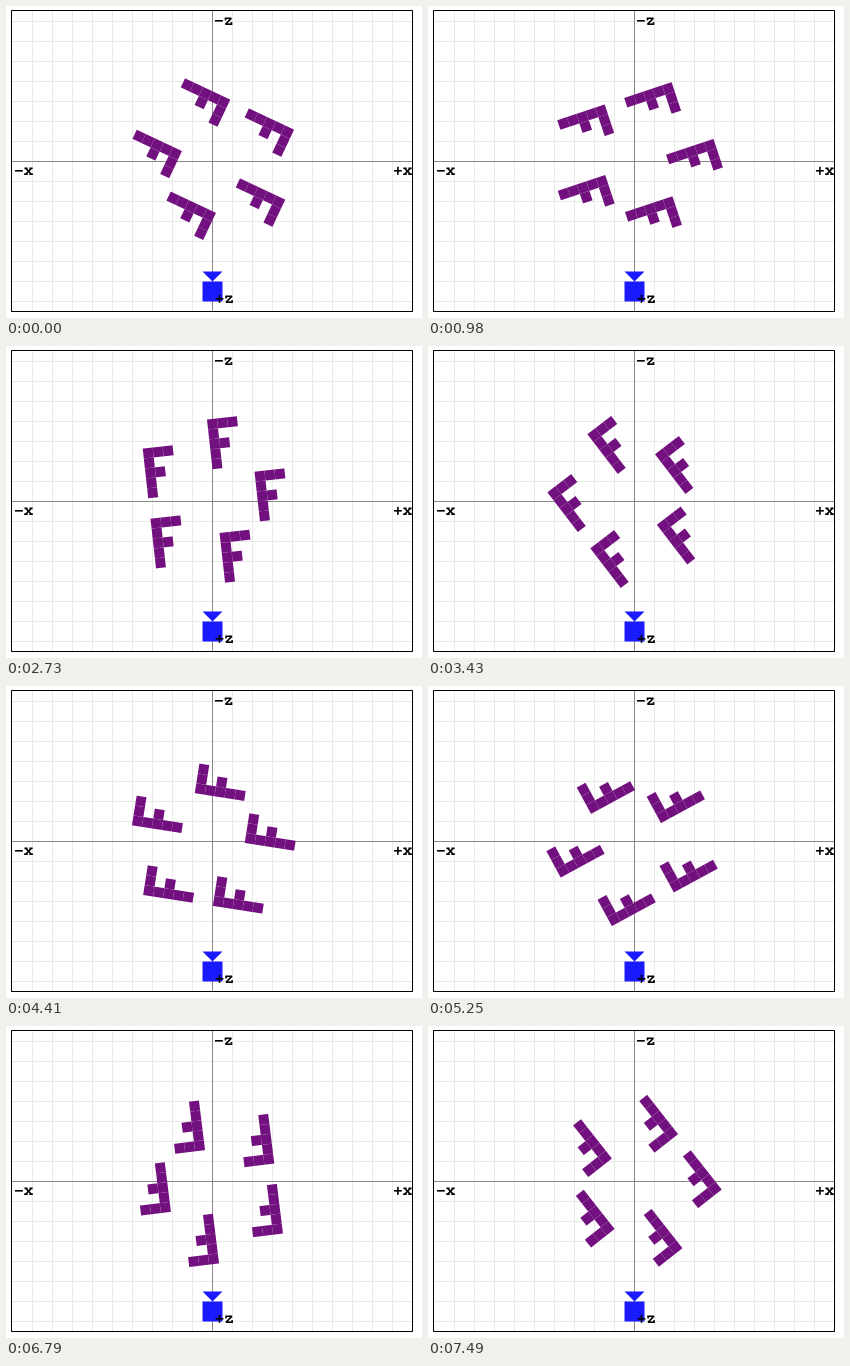
Write a matplotlib script that moves like this. It is 416 px wide and 312 px high and loops after 7560 ms.

```python
import numpy as np
import matplotlib.pyplot as plt
from matplotlib.animation import FuncAnimation
from matplotlib.patches import Polygon, Rectangle

W, H, DPI = 416, 312, 100
FRAMES, INTERVAL = 108, 70
CX, CY = 206.5, 155.5
RADIUS, COUNT = 60, 5
START, STEP = 115.2, -3.116      # degrees, degrees per frame
PURPLE, BLUE, GRID, AXIS = "#71107e", "#1a1aff", "#e9e9e9", "#888888"
PX = 72 / DPI

# The letter F is built from square cells on a 3 by 5 grid
LETTER = ["###", "#", "##", "#", "#"]
CELL = 10

# Strokes of the typewriter labels, y measured from the baseline
ADVANCE = 9.6
GLYPHS = {
    "-": [[(1, -4.2), (8.8, -4.2)]],
    "+": [[(1, -4.2), (8.8, -4.2)], [(4.9, -8.2), (4.9, -0.2)]],
    "z": [[(1.9, -4.6), (1.9, -6.7), (7.7, -6.7), (1.9, -0.8),
           (7.9, -0.8), (7.9, -2.9)]],
    "x": [[(2.1, -6.7), (7.7, -0.8)], [(7.7, -6.7), (2.1, -0.8)],
          [(0.8, -6.7), (3.9, -6.7)], [(5.9, -6.7), (9, -6.7)],
          [(0.5, -0.8), (4.1, -0.8)], [(5.7, -0.8), (9.3, -0.8)]],
}

fig = plt.figure(figsize=(W / DPI, H / DPI), dpi=DPI, facecolor="white")
ax = fig.add_axes([0, 0, 1, 1])
ax.set_xlim(0, W)
ax.set_ylim(H, 0)
ax.axis("off")


def line(xs, ys, color, width=1, z=1):
    ax.plot(xs, ys, color=color, lw=width * PX, zorder=z, snap=False,
            solid_capstyle="butt", solid_joinstyle="miter")


def shape(pts, color, z):
    patch = Polygon(pts, fc=color, lw=0, zorder=z, snap=False)
    ax.add_patch(patch)
    return patch


def square(x, y, size):
    return np.array([(x, y), (x + size, y), (x + size, y + size), (x, y + size)])


def label(x, y, text):
    for i, char in enumerate(text):
        for stroke in GLYPHS[char]:
            pts = np.array(stroke) + (x + i * ADVANCE, y)
            line(pts[:, 0], pts[:, 1], "black", 1.6, 6)


def draw_scene():
    for x in np.arange(26.5, 406, 20):
        line([x, x], [5, 305], GRID)
    for y in np.arange(15.5, 305, 20):
        line([6, 406], [y, y], GRID)
    line([CX, CX], [5, 305], AXIS)
    line([6, 406], [CY, CY], AXIS)
    ax.add_patch(Rectangle((5.5, 4.5), 401, 301, fill=False, ec="black",
                           lw=PX, zorder=2, snap=False))
    shape(square(CX - 10, CY + 120, 20), BLUE, 5)
    shape([(CX - 10, CY + 110), (CX + 10, CY + 110), (CX, CY + 120)], BLUE, 5)
    label(208, 19, "-z")
    label(208.6, 297, "+z")
    label(8, 169, "-x")
    label(387, 169, "+x")


draw_scene()

cells = []
for k in range(COUNT):
    a = 2 * np.pi * k / COUNT
    offset = RADIUS * np.array([np.cos(a), np.sin(a)]) - (1.5 * CELL, 2.5 * CELL)
    for row, marks in enumerate(LETTER):
        for col in range(len(marks)):
            pts = square(col * CELL, row * CELL, CELL) + offset
            cells.append((shape(pts, PURPLE, 3), pts))


def update(i):
    t = np.radians(START + STEP * i)
    c, s = np.cos(t), np.sin(t)
    turn = np.array([[c, s], [-s, c]])
    for patch, pts in cells:
        patch.set_xy(pts @ turn + (CX, CY))
    return [patch for patch, _ in cells]


anim = FuncAnimation(fig, update, frames=FRAMES, interval=INTERVAL,
                     repeat=True, repeat_delay=0, blit=False)
plt.show()
```
